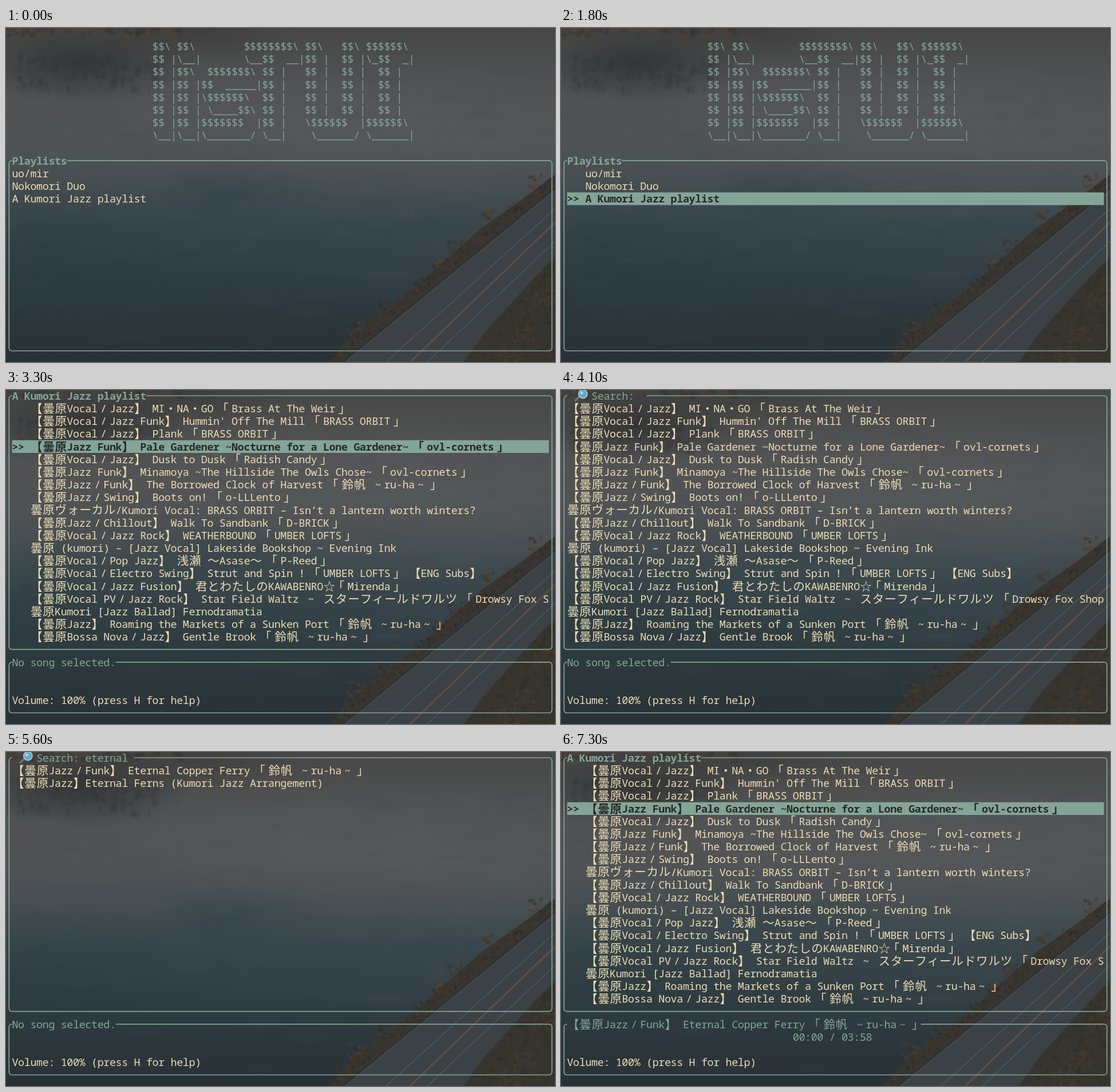
Animation, 959 px wide and 584 px high, one loop 8 s. Source, as an HTML page with a canvas:

```html
<!DOCTYPE html>
<html lang="ja">
<head>
<meta charset="utf-8">
<title>Terminal music player</title>
<style>
  html, body { margin: 0; width: 100%; height: 100%; overflow: hidden; background: #333b3f; }
  canvas { display: block; }
</style>
</head>
<body>
<canvas id="stage" width="959" height="584"></canvas>
<script>
const WIDTH = 959, HEIGHT = 584, LOOP = 8000;
const CELL = WIDTH / 90, ROW = 22.18, LAST_COL = 89;
const ACCENT = "#83a598", CREAM = "#ebdbb2", DARK = "#282828";
const MONO = '18.4px "Noto Sans Mono", "DejaVu Sans Mono", monospace';
const CJK = '20.6px "Noto Sans CJK JP", "Noto Sans CJK", sans-serif';
const ctx = document.getElementById("stage").getContext("2d");

const LOGO = String.raw`
$$\ $$\        $$$$$$$$\ $$\   $$\ $$$$$$\
$$ |\__|       \__$$  __|$$ |  $$ |\_$$  _|
$$ |$$\  $$$$$$$\ $$ |   $$ |  $$ |  $$ |
$$ |$$ |$$  _____|$$ |   $$ |  $$ |  $$ |
$$ |$$ |\$$$$$$\  $$ |   $$ |  $$ |  $$ |
$$ |$$ | \____$$\ $$ |   $$ |  $$ |  $$ |
$$ |$$ |$$$$$$$  |$$ |   \$$$$$$  |$$$$$$\
\__|\__|\_______/ \__|    \______/ \______|`.slice(1).split("\n");

const PLAYLISTS = ["uo/mir", "Nokomori Duo", "A Kumori Jazz playlist"];
const PLAYING = "【曇原Jazz／Funk】 Eternal Copper Ferry 「鈴帆 ～ru-ha～」";
const SONGS = [
  "【曇原Vocal／Jazz】 MI・NA・GO 「Brass At The Weir」",
  "【曇原Vocal／Jazz Funk】 Hummin' Off The Mill 「BRASS ORBIT」",
  "【曇原Vocal／Jazz】 Plank 「BRASS ORBIT」",
  "【曇原Jazz Funk】 Pale Gardener ~Nocturne for a Lone Gardener~ 「ovl-cornets」",
  "【曇原Vocal／Jazz】 Dusk to Dusk 「Radish Candy」",
  "【曇原Jazz Funk】 Minamoya ~The Hillside The Owls Chose~ 「ovl-cornets」",
  "【曇原Jazz／Funk】 The Borrowed Clock of Harvest 「鈴帆 ～ru-ha～」",
  "【曇原Jazz／Swing】 Boots on! 「o-LLLento」",
  "曇原ヴォーカル/Kumori Vocal: BRASS ORBIT – Isn’t a lantern worth winters?",
  "【曇原Jazz／Chillout】 Walk To Sandbank 「D-BRICK」",
  "【曇原Vocal／Jazz Rock】 WEATHERBOUND 「UMBER LOFTS」",
  "曇原 (kumori) – [Jazz Vocal] Lakeside Bookshop ~ Evening Ink",
  "【曇原Vocal／Pop Jazz】 浅瀬 〜Asase〜 「P-Reed」",
  "【曇原Vocal／Electro Swing】 Strut and Spin ! 「UMBER LOFTS」 【ENG Subs】",
  "【曇原Vocal／Jazz Fusion】 君とわたしのKAWABENRO☆ 「Mirenda」",
  "【曇原Vocal PV／Jazz Rock】 Star Field Waltz ～ スターフィールドワルツ 「Drowsy Fox Shop」",
  "曇原Kumori [Jazz Ballad] Fernodramatia",
  "【曇原Jazz】 Roaming the Markets of a Sunken Port 「鈴帆 ～ru-ha～」",
  "【曇原Bossa Nova／Jazz】 Gentle Brook 「鈴帆 ～ru-ha～」",
  "【曇原Jazz】 The Path of the Clockmaker Boy ~ Cold Path 「鈴帆 ～ru-ha～」",
  "[Kumori Vocal] [Ume no Kosaji] Aoi Minato no Rondo (spanish & english subtitles)",
  "[Kumori Vocal] [QK-Timbre] The Lamplight Accompanies a Silent Walker (spanish & english subtitles)",
  PLAYING,
  "【曇原Jazz】Eternal Ferns (Kumori Jazz Arrangement)",
];

// ---- Backdrop: misty lake with a road in the lower right corner ----

function makeBackdrop() {
  const canvas = document.createElement("canvas");
  canvas.width = WIDTH;
  canvas.height = HEIGHT;
  const c = canvas.getContext("2d");
  let seed = 7;
  const random = () => (seed = seed * 16807 % 2147483647) / 2147483647;
  const between = (a, b) => a + (b - a) * random();

  function blob(x, y, rx, ry, rgb, alpha) {
    c.save();
    c.translate(x, y);
    c.scale(rx, ry);
    const glow = c.createRadialGradient(0, 0, 0, 0, 0, 1);
    glow.addColorStop(0, `rgba(${rgb},${alpha})`);
    glow.addColorStop(1, `rgba(${rgb},0)`);
    c.fillStyle = glow;
    c.fillRect(-1, -1, 2, 2);
    c.restore();
  }
  function shape(color, ...points) {
    c.fillStyle = color;
    c.beginPath();
    points.forEach(p => c.lineTo(...p));
    c.fill();
  }
  function stripe(color, width, x1, y1, x2, y2) {
    c.strokeStyle = color;
    c.lineWidth = width;
    c.beginPath();
    c.moveTo(x1, y1);
    c.lineTo(x2, y2);
    c.stroke();
  }

  const mist = c.createLinearGradient(0, 0, 0, HEIGHT);
  [[0, "#474747"], [.17, "#505152"], [.34, "#505355"], [.45, "#474e51"],
   [.58, "#39474c"], [.77, "#2e3b40"], [1, "#283136"]]
    .forEach(stop => mist.addColorStop(...stop));
  c.fillStyle = mist;
  c.fillRect(0, 0, WIDTH, HEIGHT);

  blob(620, 170, 420, 130, "92,94,95", .4);
  blob(880, 220, 260, 120, "86,89,92", .3);
  blob(300, 130, 260, 70, "86,88,88", .25);
  blob(390, 290, 150, 60, "42,60,68", .4);
  blob(90, 400, 320, 140, "40,56,62", .35);
  blob(760, 400, 260, 120, "60,70,77", .35);
  blob(130, 60, 200, 75, "42,44,45", .7);
  blob(330, 5, 180, 60, "54,54,54", .5);
  for (let i = 0; i < 220; i++) {
    blob(between(0, WIDTH), between(70, 560), between(15, 60), between(5, 16),
      i % 2 ? "100,108,112" : "28,42,48", .05);
  }
  for (let i = 0; i < 90; i++) {
    const x = between(0, 310);
    blob(x, between(0, 14), between(3, 10), between(3, 9),
      i % 2 ? "84,62,48" : "46,43,41", .4);
    blob(x * .8 + 20, between(50, 110), between(3, 9), between(5, 14), "42,44,45", .25);
  }

  // Left bank, following the road
  shape("#38352f", [959, 256], [900, 301], [830, 350], [765, 408], [700, 466],
    [640, 508], [590, 552], [565, 584], [600, 584], [959, 290]);
  for (let i = 0; i < 520; i++) {
    const t = random(), r = between(1.5, 4.5);
    blob(955 - 380 * t + between(-8, 8), 271 + 304 * t + between(-12, 9), r, r,
      ["74,58,45", "38,36,35", "60,53,47", "44,48,46"][i % 4], .55);
  }
  [[925, 268, 18], [885, 318, 14], [842, 328, 13], [785, 382, 16],
   [752, 412, 10], [655, 490, 16], [612, 522, 18]].forEach(([x, y, size], i) => {
    for (let n = 0; n < 26; n++) {
      blob(x + between(-size, size) * .8, y + between(-size, size) * .7, 4, 4,
        n % 3 ? i % 2 ? "66,54,45" : "86,64,42" : "44,40,37", .5);
    }
  });

  // Road, markings and the right verge
  shape("#3b4145", [959, 282], [770, 432], [590, 584], [820, 584], [959, 400]);
  stripe("#2b3135", 2.5, 959, 280, 588, 584);
  stripe("#4b5356", 1, 959, 284, 594, 584);
  stripe("#545b5d", 1.2, 959, 316, 664, 584);
  stripe("#5c4d48", 3.4, 959, 340, 706, 584);
  stripe("#545a5c", 1.2, 959, 373, 736, 584);
  shape("#35342e", [959, 400], [920, 440], [880, 484], [835, 534], [800, 584], [959, 584]);
  for (let i = 0; i < 420; i++) {
    const y = between(410, 584), edge = 959 - (y - 400) * .86;
    blob(between(edge, 962), y, between(2, 7), between(2, 6),
      ["60,56,41", "40,40,36", "48,45,39", "68,54,39"][i % 4], .45);
  }
  [[905, 540], [940, 470], [880, 572]].forEach(([x, y]) => {
    for (let n = 0; n < 30; n++) blob(x + between(-20, 20), y + between(-16, 16), 4, 4, "88,65,41", .35);
  });
  return canvas;
}

// ---- Terminal grid ----

const isWide = ch => /[\u3000-\u30ff\u4e00-\u9fff\uff00-\uff60]|🔎/u.test(ch);
const cellsOf = ch => isWide(ch) ? 2 : 1;
const columns = text => [...text].reduce((sum, ch) => sum + cellsOf(ch), 0);
const rowCenter = row => 10 + row * ROW;
// Two-cell characters shown as a narrow glyph in the middle of their cells
const COMPACT = { "／": "/", "～": "~", "「": "｢", "」": "｣" };

function magnifier(x, y) {
  ctx.lineCap = "round";
  ctx.strokeStyle = "#6b6c70";
  ctx.lineWidth = 4;
  ctx.beginPath();
  ctx.moveTo(x + 4, y + 8);
  ctx.lineTo(x + 10, y + 2);
  ctx.stroke();
  ctx.lineCap = "butt";
  ctx.beginPath();
  ctx.arc(x + 17, y - 3, 7.5, 0, 7);
  ctx.fillStyle = "#5aa9cf";
  ctx.fill();
  ctx.strokeStyle = "#aebdc2";
  ctx.lineWidth = 2;
  ctx.stroke();
  ctx.fillStyle = "#a9dcec";
  ctx.beginPath();
  ctx.arc(x + 15, y - 5, 2.6, 0, 7);
  ctx.fill();
}

function write(text, col, row, color = CREAM, bold = false) {
  const y = rowCenter(row), weight = bold ? "bold " : "";
  ctx.textAlign = "center";
  for (const ch of text) {
    const span = cellsOf(ch), glyph = COMPACT[ch] || ch;
    if (col + span > LAST_COL) break;
    const x = (col + span / 2) * CELL;
    if (ch === "🔎") {
      magnifier(col * CELL, y);
    } else {
      const large = /[☆｢｣]/.test(glyph) || span === 2 && glyph === ch;
      ctx.font = weight + (large ? CJK : MONO);
      ctx.fillStyle = color;
      ctx.fillText(glyph, ch === "☆" ? x + CELL / 2 : x, y + (large ? 7.8 : 6.9));
    }
    col += span;
  }
}

// Rounded frame whose top edge is left open for the title
function panel(title, top, bottom, bold = false) {
  const left = CELL / 2, right = WIDTH - CELL / 2, radius = 5;
  const y1 = rowCenter(top), y2 = rowCenter(bottom);
  ctx.strokeStyle = ACCENT;
  ctx.lineWidth = 1.7;
  ctx.beginPath();
  ctx.moveTo((1 + columns(title)) * CELL, y1);
  ctx.arcTo(right, y1, right, y2, radius);
  ctx.arcTo(right, y2, left, y2, radius);
  ctx.arcTo(left, y2, left, y1, radius);
  ctx.arcTo(left, y1, right, y1, radius);
  ctx.lineTo(CELL, y1);
  ctx.stroke();
  write(title, 1, top, ACCENT, bold);
}

function list(items, top, selected, limit = 19) {
  const indent = selected < 0 ? 1 : 4;
  items.slice(0, limit).forEach((item, i) => {
    const active = i === selected, row = top + i;
    if (active) {
      ctx.fillStyle = ACCENT;
      ctx.fillRect(CELL, row * ROW - .9, (LAST_COL - 1) * CELL, ROW);
      write(">>", 1, row, DARK, true);
    }
    write(item, indent, row, active ? DARK : CREAM, active);
  });
}

// ---- Screens ----

function home(selected = -1) {
  LOGO.forEach((line, i) => write(line, 24, i + 1, ACCENT));
  panel("Playlists", 10, 25, true);
  list(PLAYLISTS, 11, selected);
}

function player(song) {
  panel(song || "No song selected.", 21, 25);
  if (song) write("00:00 / 03:58", 38, 22, ACCENT);
  write("Volume: 100% (press H for help)", 1, 24);
}

function songs(selected = -1, song) {
  panel(PLAYLISTS[2], 0, 20, true);
  list(SONGS, 1, selected);
  player(song);
}

function search(query, selected = -1) {
  panel(` 🔎 Search: ${query} `, 0, 20);
  list(SONGS.filter(song => song.toLowerCase().includes(query)), 1, selected);
  player();
}

const TIMELINE = [
  [0, () => home()],
  [800, () => home(0)],
  [1000, () => home(1)],
  [1800, () => home(2)],
  [2300, () => songs()],
  [3300, () => songs(3)],
  [4100, () => search("")],
  [5100, () => search("e")],
  [5300, () => search("et")],
  [5400, () => search("eter")],
  [5500, () => search("etern")],
  [5600, () => search("eternal")],
  [6400, () => search("eternal", 0)],
  [7300, () => songs(3, PLAYING)],
];

const backdrop = makeBackdrop();
const start = performance.now();
let shown;

function frame() {
  const time = (performance.now() - start) % LOOP;
  const step = TIMELINE.findLast(([from]) => from <= time);
  if (step !== shown) {
    shown = step;
    ctx.drawImage(backdrop, 0, 0);
    step[1]();
  }
  requestAnimationFrame(frame);
}
frame();
</script>
</body>
</html>
```
